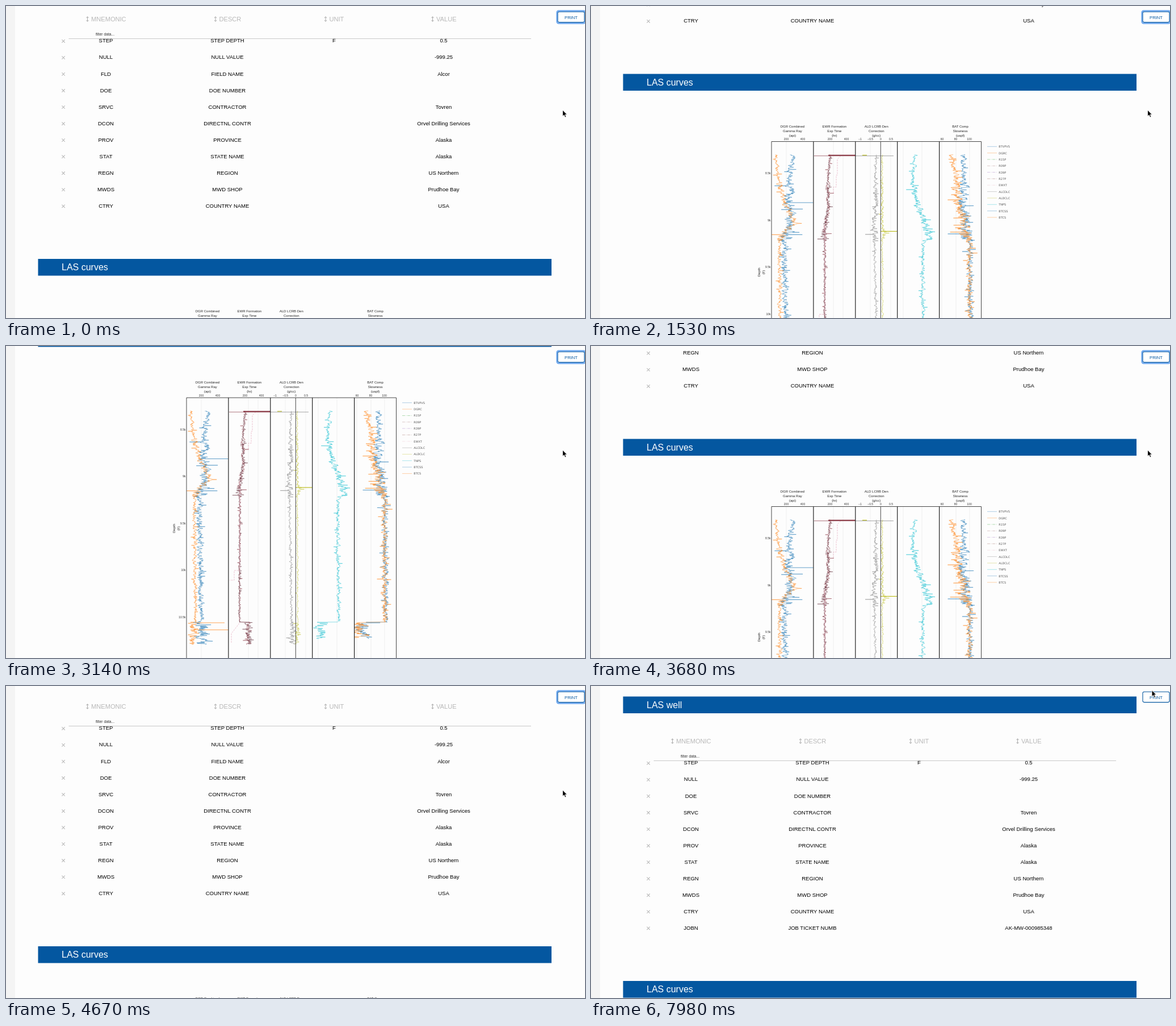
These frames come from a looping animation (1020 by 549 pixels, 8 s). An HTML page:

```html
<!DOCTYPE html>
<html lang="en">
<head>
<meta charset="utf-8">
<title>Well log viewer</title>
<style>
  html, body { margin: 0; width: 100%; height: 100%; overflow: hidden; background: #fdfdfd; }
  svg { display: block; width: 1020px; height: 549px; font-family: "Liberation Sans", Arial, sans-serif; }
  path { fill: none; }
</style>
</head>
<body>
<svg id="stage" viewBox="0 0 1020 549"></svg>
<script>
const LOOP = 8000, ROW = 29.05, BLUE = '#0457a0';
const stage = document.getElementById('stage');

function add(parent, tag, attrs = {}, text = '') {
  const node = document.createElementNS('http://www.w3.org/2000/svg', tag);
  for (const key in attrs) node.setAttribute(key, attrs[key]);
  node.textContent = text;
  parent.append(node);
  return node;
}
const group = (parent, attrs) => add(parent, 'g', attrs);
const rect = (parent, x, y, width, height, fill, more) =>
  add(parent, 'rect', { x, y, width, height, fill, ...more });
const path = (parent, d, stroke, width = 0.6, more) =>
  add(parent, 'path', { d, stroke, 'stroke-width': width, ...more });
const label = (parent, x, y, text, size, fill = '#000', anchor = 'middle', more) =>
  add(parent, 'text', { x, y, fill, 'font-size': size, 'text-anchor': anchor, ...more }, text);

// The page scrolls as one group; y = 0 is the top of the "LAS curves" bar.
const page = group(stage);

function sectionBar(y, title) {
  rect(page, 56.5, y, 904.5, 29.5, BLUE);
  label(page, 98, y + 20.3, title, 16, '#fff', 'start');
}
sectionBar(-500.5, 'LAS well');
sectionBar(0, 'LAS curves');

// Table
const columns = [176, 390, 578, 771];
[['MNEMONIC', 150], ['DESCR', 375.5], ['UNIT', 569.5], ['VALUE', 758]].forEach(([name, x]) => {
  label(page, x, -417.8, name, 11.1, '#b8b8b8', 'start');
  path(page, `M${x - 6.5} -426v8m-2-6l2-2.3 2 2.3m-4 4l2 2.3 2-2.3`, '#aaa', 1);
});
label(page, 174.5, -393.5, 'filter data...', 6.7, '#333');

const rows = [
  ['STEP', 'STEP DEPTH', 'F', '0.5'],
  ['NULL', 'NULL VALUE', '', '-999.25'],
  ['FLD', 'FIELD NAME', '', 'Alcor'],
  ['DOE', 'DOE NUMBER', '', ''],
  ['SRVC', 'CONTRACTOR', '', 'Tovren'],
  ['DCON', 'DIRECTNL CONTR', '', 'Orvel Drilling Services'],
  ['PROV', 'PROVINCE', '', 'Alaska'],
  ['STAT', 'STATE NAME', '', 'Alaska'],
  ['REGN', 'REGION', '', 'US Northern'],
  ['MWDS', 'MWD SHOP', '', 'Prudhoe Bay'],
  ['CTRY', 'COUNTRY NAME', '', 'USA'],
  ['JOBN', 'JOB TICKET NUMB', '', 'AK-MW-000985348']
].map(cells => {
  const node = group(page);
  cells.forEach((cell, i) => label(node, columns[i], 3.4, cell, 9.5));
  return { node, cross: path(node, 'M98.4 -1.9l5.4 5.4m0 -5.4l-5.4 5.4', '#bbb', 1.1) };
});
rect(page, 110.5, -388, 814.5, 1, '#c8c8c8');

// Chart
const chart = group(page, { transform: 'translate(0 28)' });
const TOP = 91, BOTTOM = 552, PANEL = 73.9;
const edge = panel => 318 + PANEL * panel;
const vertical = (x, color, width) => path(chart, `M${x} ${TOP}V${BOTTOM}`, color, width);

for (const x of [344, 427, 444, 492, 528, 550, 583, 618, 643, 667]) vertical(x, '#e8e8e8', 0.7);

// Panel titles with their tick labels: first tick position, spacing, texts.
[['DGR Combined|Gamma Ray|(api)', 0, 344, 29, [200, 400]],
 ['EWR Formation|Exp Time|(hr)', 1, 421, 29, [200, 400]],
 ['ALD LCRB Den|Correction|(g/cc)', 2, 474, 18.2, ['−1', '−0.5', 0, 0.5]],
 ['BAT Comp|Slowness|(uspf)', 4, 618.5, 24, [60, 80, 100]]].forEach(([title, panel, first, gap, ticks]) => {
  title.split('|').forEach((line, i) => label(chart, edge(panel + 0.5), 66.4 + 7.9 * i, line, 6, '#222'));
  ticks.forEach((tick, i) => label(chart, first + gap * i, 88.6, tick, 5, '#333'));
});
['8.5k', '9k', '9.5k', '10k', '10.5k'].forEach((tick, i) =>
  label(chart, 316.5, 148.8 + 82.5 * i, tick, 5, '#333', 'end'));
['Depth', '(F)'].forEach((word, i) =>
  label(chart, 0, 0, word, 6, '#222', 'middle', { transform: `translate(${297.5 + 8 * i} 321) rotate(-90)` }));

let seed = 7;
const random = () => (seed = seed * 16807 % 2147483647) / 2147483647;

// All curves share the same rock layers: key depths and how rough each layer is.
const depths = [114, 163, 205, 235, 255, 272, 486];
const roughness = y => y < 163 ? 0.6 : y < 243 ? 1 : y < 266 ? 1.5 : y < 486 ? 0.55 : 1.5;

// Noisy curve through one level per key depth, then a jump to its deepest level.
function trace(panel, color, noise, deepest, levels) {
  const points = [], end = panel < 3 ? 525 : 515;
  let drift = 0;
  for (let y = depths[0]; y < end; y += 0.45) {
    const k = depths.findLastIndex(depth => depth <= y);
    const p = (y - depths[k]) / (depths[k + 1] - depths[k]);
    const level = y < 486 ? levels[k] + (levels[k + 1] - levels[k]) * p : deepest;
    drift = drift * 0.65 + random() - 0.5;
    const spike = random() < 0.04 ? (random() - 0.5) * 3 : 0;
    const x = level + noise * roughness(y) * (drift + spike);
    points.push(Math.min(edge(panel + 1), Math.max(edge(panel), x)).toFixed(1) + ' ' + y.toFixed(1));
  }
  path(chart, 'M' + points.join('L'), color, 0.6, { opacity: 0.8 });
}
const streak = (color, y, from, to, width = 0.7) => path(chart, `M${from} ${y}H${to}`, color, width);

const blue = '#1f77b4', orange = '#ff7f0e', maroon = '#8b3a46', pink = '#e9b3c4',
      gray = '#7f7f7f', olive = '#bcbd22', cyan = '#17becf';

trace(0, blue, 13, 345, [355, 349, 349, 352, 343, 341, 343]);
trace(0, orange, 8, 329, [325, 331, 345, 357, 337, 332, 334]);
trace(1, maroon, 5, 428, [421, 417, 419, 413, 412, 412, 411]);
trace(1, '#64323e', 5, 428, [421, 417, 419, 413, 412, 412, 411]);
trace(2, gray, 6, 504, [501, 501, 502, 499, 499, 500, 503]);
trace(2, olive, 3.5, 513, [513, 513, 513, 513, 517, 513, 514]);
trace(3, cyan, 9, 552, [572, 567, 575, 588, 597, 584, 586]);
trace(4, blue, 13, 632, [657, 657, 655, 660, 664, 668, 669]);
trace(4, orange, 13, 626, [638, 644, 648, 657, 660, 666, 667]);

path(chart, 'M440 116L434 122V150H432V171H427V182M412 240V395H402V412H394M411 488L397 506V522',
  pink, 0.8, { 'stroke-dasharray': '3 1.5' });
streak(maroon, 115.2, 418, 466, 2);
streak(maroon, 116.2, 393, 466);
streak(olive, 115, 478, 486, 1.2);
streak(gray, 116.2, 466, 533);
streak(blue, 198.5, 350, 391.5);
streak(orange, 487, 333, 385);
streak(orange, 499.5, 330, 391.5);
streak(olive, 249, 510, 539, 1.2);

path(chart, `M318 ${TOP}H${edge(5)}V${BOTTOM}H318Z`, '#333', 0.9);
for (let panel = 1; panel < 5; panel++) vertical(edge(panel), '#222', 1.2);
vertical(510.3, '#333', 0.9);

[['BTVPVS', blue], ['DGRC', orange], ['R15P', '#2ca02c', 1], ['R09P', '#a06a6a', 1], ['R39P', '#9467bd', 1],
 ['R27P', '#8c564b', 1], ['EWXT', pink, 1], ['ALCDLC', gray], ['ALDCLC', olive], ['TNPS', cyan],
 ['BTCSS', blue], ['BTCS', orange]].forEach(([name, color, dashed], i) => {
  const y = 99.8 + 11.33 * i;
  path(chart, `M698 ${y}h17`, color, 0.6, { opacity: 0.6, 'stroke-dasharray': dashed ? '5 1.5 1 1.5' : 'none' });
  label(chart, 718.3, y + 1.9, name, 5, '#555', 'start', { 'font-family': '"DejaVu Sans", sans-serif' });
});

// Fixed parts
rect(stage, 0, 0, 16, 549, '#f4f4f4');
const focusRing = rect(stage, 970.5, 8.5, 50, 22, '#fff', { rx: 3, stroke: '#6fa8f0', 'stroke-width': 2.3 });
rect(stage, 972, 10.2, 47, 18.4, '#fff', { rx: 2.5, stroke: BLUE, 'stroke-width': 1.1 });
label(stage, 995.5, 22.9, 'PRINT', 7.6, BLUE);

const arrow = add(stage, 'path', {
  d: 'M0 0V11.2L2.6 8.8 4.4 13 6.4 12.1 4.6 8.1H8Z',
  style: 'fill:#000', stroke: '#fff', 'stroke-width': 0.9
});
const hand = add(stage, 'path', {
  d: 'M-1.5 8L-4 4.8Q-4.8 3.3 -3.2 3.2L-1.6 4.6 -2.8 0.4Q-2.6 -1 -1.2 -0.2L0.2 3.2Q1 2 2 3.2 3 2.2 3.8 3.5 5.4 3 5.6 4.8 5.8 8 4.4 9.6V12.4H-0.6V10.4Z M1 6.5v3m1.7-3v3',
  style: 'fill:#fff', stroke: '#000', 'stroke-width': 0.9, 'stroke-linejoin': 'round'
});

// Scroll flicks: first and last change, number of hard steps, resting position of the bar.
const flicks = [
  [150, 150, 1, 435], [900, 1080, 2, 150.4], [1530, 1710, 2, 100.4],
  [2010, 2690, 5, -104.7], [3140, 4010, 6, 238], [4190, 4990, 6, 519]
];
const DELETE_AT = 7100, BLUR_AT = 6500;

// Share of a move done at time t, in `count` equal steps from first to last change.
function stepped(t, first, last, count) {
  if (t < first) return 0;
  if (t >= last) return 1;
  return (Math.floor((t - first) / (last - first) * (count - 1) + 1e-6) + 1) / count;
}
const easeOut = p => 1 - (1 - p) ** 1.39;
const easeInOut = p => p * p * (3 - 2 * p);

function draw(t) {
  const scroll = flicks.reduce((from, [first, last, count, to]) =>
    from + (to - from) * easeOut(stepped(t, first, last, count)), 445);
  page.setAttribute('transform', `translate(0 ${Math.round(scroll * 2) / 2})`);

  const toCross = easeInOut(stepped(t, 5290, 6210, 7));
  const toPrint = easeInOut(stepped(t, 7247, 7980, 6));
  const onCross = toCross === 1 && toPrint === 0;
  const x = 980.5 - 879.5 * toCross + 887 * toPrint;
  const y = 183 + 12 * toCross - 12 * Math.sin(2 * Math.PI * toCross) - 187.5 * toPrint;
  for (const cursor of [arrow, hand]) cursor.setAttribute('transform', `translate(${x} ${y})`);
  arrow.setAttribute('visibility', onCross ? 'hidden' : 'visible');
  hand.setAttribute('visibility', onCross ? 'visible' : 'hidden');

  const deleted = t >= DELETE_AT;
  rows.forEach(({ node, cross }, i) => {
    const slot = deleted && i > 2 ? i - 1 : i;
    node.setAttribute('transform', `translate(0 ${-384 + ROW * slot})`);
    node.setAttribute('visibility', slot > 10 || (deleted && i === 2) ? 'hidden' : 'visible');
    cross.setAttribute('stroke', onCross && slot === 2 ? '#e0359a' : '#bbb');
  });
  focusRing.setAttribute('visibility', t < BLUR_AT ? 'visible' : 'hidden');
}

const begin = performance.now();
function tick() {
  draw((performance.now() - begin) % LOOP);
  requestAnimationFrame(tick);
}
tick();
</script>
</body>
</html>
```
